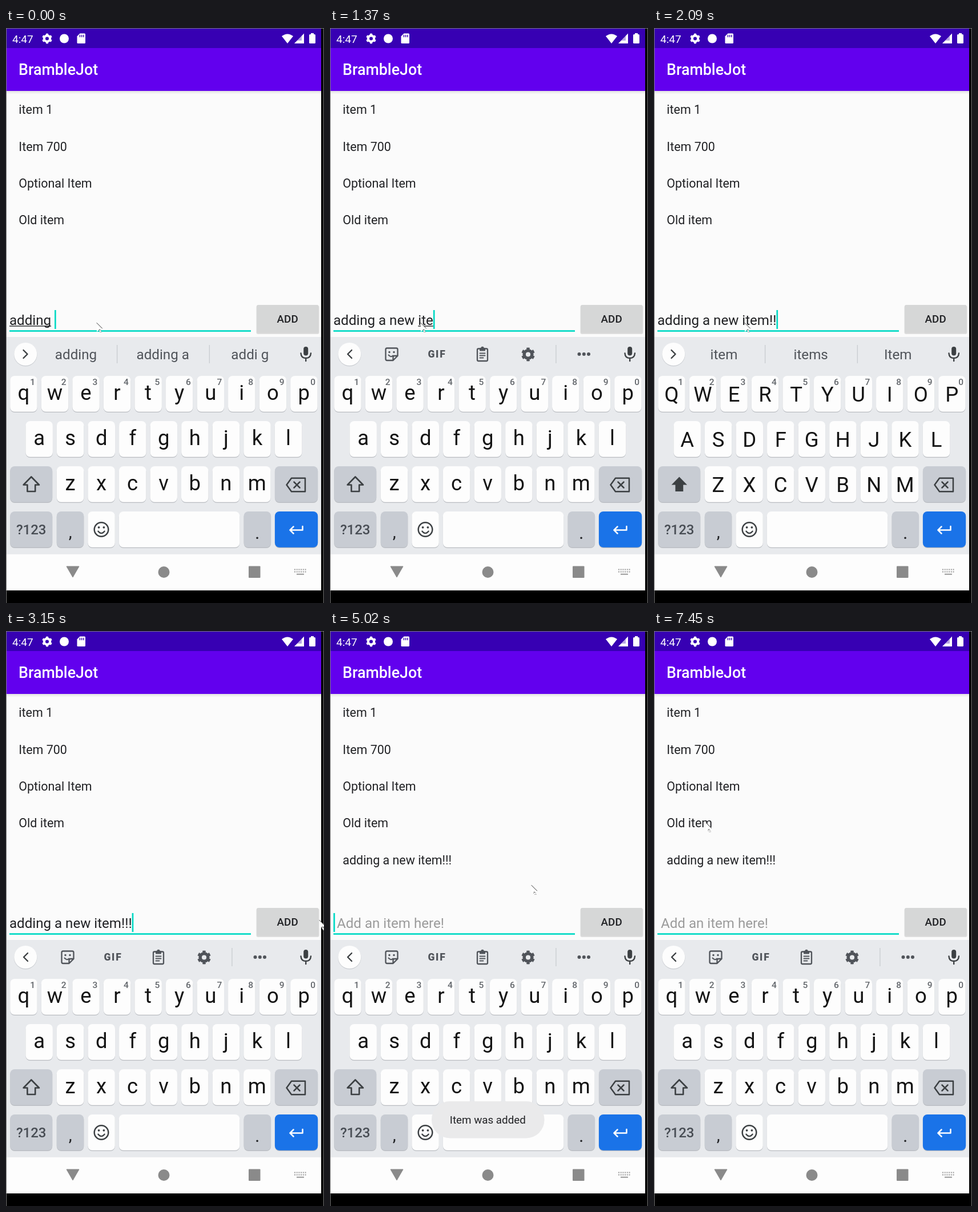
An HTML page that plays this animation: 557 px wide and 1005 px high, repeating every 8 s.

```html
<!DOCTYPE html>
<html lang="en">
<head>
<meta charset="utf-8">
<title>To-do list</title>
<style>
html, body { margin: 0; width: 100%; height: 100%; overflow: hidden; background: #000; }
svg { display: block; width: 557px; height: 1005px; font-family: Roboto, sans-serif; }
text { white-space: pre; }
.mid { text-anchor: middle; }
.line { fill: none; stroke-linecap: round; stroke-linejoin: round; }
</style>
</head>
<body>
<svg id="stage" viewBox="0 0 557 1005"></svg>
<script>
const LOOP = 8000;
const INK = '#202124', ICON = '#50545a', DARK = '#3c4043';
const stage = document.getElementById('stage');

const rect = (x, y, w, h, fill, r = 0, more = '') =>
  `<rect x="${x}" y="${y}" width="${w}" height="${h}" rx="${r}" fill="${fill}" ${more}/>`;
const circle = (x, y, r, fill, more = '') =>
  `<circle cx="${x}" cy="${y}" r="${r}" fill="${fill}" ${more}/>`;
const path = (d, fill, more = '') => `<path d="${d}" fill="${fill}" ${more}/>`;
const line = (d, color, width) =>
  `<path class="line" d="${d}" stroke="${color}" stroke-width="${width}"/>`;
const text = (s, x, y, size, fill, more = '') =>
  `<text x="${x}" y="${y}" font-size="${size}" fill="${fill}" ${more}>${s}</text>`;
const mid = (s, x, y, size, fill, more = '') => text(s, x, y, size, fill, 'class="mid" ' + more);
const group = (id, body, more = '') => `<g id="${id}" ${more}>${body}</g>`;

function gear(x, y, r, color) {
  return circle(x, y, r * 0.57, 'none', `stroke="${color}" stroke-width="${r * 0.46}"`) +
    circle(x, y, r * 0.84, 'none', `stroke="${color}" stroke-width="${r * 0.3}" pathLength="12" stroke-dasharray="1 1" stroke-dashoffset="-.5"`);
}

function statusBar() {
  return rect(1, 1, 551, 34, '#3700b3') +
    text('4:47', 11, 26, 19, '#fff') +
    gear(72, 18.5, 9, '#fff') +
    circle(102, 18.5, 8, '#fff') +
    path('M129.5 9.5H137.5Q139 9.5 139 11V25.5Q139 27 137.5 27H126Q124.5 27 124.5 25.5V14.5Z', '#fff') +
    line('M129.5 12.5V15.5M132.7 12.5V15.5M135.9 12.5V15.5', '#3700b3', 1.5) +
    path('M483 14.3Q493 6.5 503 14.3L493 27Z', '#fff') +
    path('M522 9.5V27H505Z', '#fff') +
    path('M518 13.5V22H510Z', '#3700b3', 'opacity=".35"') +
    rect(531, 11, 11, 16, '#fff', 1.5) + rect(534, 9, 5, 3, '#fff');
}

function appBar() {
  return rect(1, 35, 551, 75, '#6200ee') +
    text('BrambleJot', 22, 82, 26.8, '#fff', 'font-weight="500"') +
    rect(1, 110, 551, 6, 'url(#shade)');
}

function list() {
  return ['item 1', 'Item 700', 'Optional Item', 'Old item', 'adding a new item!!!']
    .map((s, i) => text(s, 22.3, 150.3 + i * 64.3, 21.45, INK, `id="row${i}"`)).join('');
}

function inputRow() {
  return text('Add an item here!', 12, 518.6, 24.12, '#9b9b9b', 'id="hint"') +
    text('', 6, 518.6, 24.12, INK, 'id="entry"') +
    rect(6, 520.3, 0, 1.4, INK, 0, 'id="mark"') +
    rect(6, 528.2, 423, 2.7, '#03dac5') +
    rect(85, 493, 2.7, 33, '#03dac5', 0, 'id="caret"') +
    rect(438.5, 485, 110, 50, '#000', 3, 'opacity=".12"') +
    rect(439, 484, 108.5, 49, '#d6d7d7', 2.5, 'id="button"') +
    mid('ADD', 493.2, 515.4, 18.8, INK, 'font-weight="500" letter-spacing=".2"');
}

function toolbar() {
  return line('M38 563L31 570L38 577', DARK, 2.4) +
    line('M100 559.5H116Q118.5 559.5 118.5 562V573L110.5 581H100Q97.5 581 97.5 578.5V562Q97.5 559.5 100 559.5ZM118 573H113Q110.5 573 110.5 575.5V580.5', ICON, 2.3) +
    circle(104, 566.5, 1.7, ICON) + circle(112, 566.5, 1.7, ICON) +
    line('M102.5 571.5Q107 576.5 110.5 572.5', ICON, 2) +
    mid('GIF', 187.5, 576, 17.5, ICON, 'font-weight="900" letter-spacing="1.8"') +
    rect(258, 560.5, 18, 21.5, 'none', 2, `stroke="${ICON}" stroke-width="2.3"`) +
    rect(262, 559, 10, 5.5, ICON, 1) + circle(267, 559.5, 2.7, ICON) +
    line('M262.5 568.5H271.5M262.5 572.5H271.5M262.5 576.5H268.5', ICON, 1.9) +
    gear(347, 570.5, 12, ICON) +
    rect(395.3, 554, 1.2, 32, '#c6c9ce') +
    [436.5, 444.8, 453].map(x => circle(x, 570, 3, ICON)).join('');
}

function suggestions() {
  return line('M30.5 563L37.5 570L30.5 577', DARK, 2.4) +
    [194, 355.7].map(x => rect(x, 554, 1.2, 32, '#c6c9ce')).join('') +
    [122.5, 274.7, 427.3].map((x, i) => mid('', x, 579.2, 24.2, ICON, `id="word${i}"`)).join('');
}

function mic() {
  return rect(521.2, 557, 8, 15.5, DARK, 4) +
    line('M516.5 568.5Q517 577 525.2 577T534 568.5M525.2 577V582', DARK, 2.4);
}

const key = (x, y, w, fill = '#fdfdfd') =>
  rect(x, y + 1.2, w, 62.8, '#b9bcc1', 8) + rect(x, y, w, 62.8, fill, 8);

function keyboard() {
  const rows = [['qwertyuiop', 7.2, 608], ['asdfghjkl', 34.4, 687], ['zxcvbnm', 88.8, 766]];
  let caps = '', small = '', out = rect(1, 540, 551, 379, '#e8eaed');
  for (const [letters, x0, y] of rows) {
    [...letters].forEach((c, i) => {
      const x = x0 + i * 54.55;
      out += key(x, y, 47.5);
      small += mid(c, x + 23.7, y + 41.5, 36.5, '#141414');
      caps += mid(c.toUpperCase(), x + 23.7, y + 45.3, 36.5, '#141414');
      if (y === 608) out += mid((i + 1) % 10, x + 39.5, 624.3, 15.5, '#62666b', 'font-weight="500"');
    });
  }
  const grey = '#c8ccd3';
  const arrow = 'M44.3 784.5L58 798.5H51.2V810H37.4V798.5H30.6Z';
  out += key(7.2, 766, 74, grey) + key(470.9, 766, 75.3, grey) +
    key(7.2, 845, 74, grey) + key(88.8, 845, 47.5, grey) + key(143.3, 845, 47.5) +
    key(197.8, 845, 211.5) + key(416.6, 845, 47.5, grey) + key(470.9, 845, 75.3, '#1a73e8');
  small += line(arrow, DARK, 2.6);
  caps += path(arrow, DARK);
  out += line('M500 786.8H524V810.3H500L491.5 798.5ZM504.5 793.5L514.5 803.5M514.5 793.5L504.5 803.5', DARK, 2.5) +
    mid('?123', 44.2, 885.3, 24, '#484d54', 'font-weight="500"') +
    mid(',', 112.6, 891, 30, INK) + mid('.', 440.3, 893, 32, INK) +
    circle(167, 876.5, 12.3, 'none', `stroke="${DARK}" stroke-width="2.5"`) +
    circle(162.6, 872.8, 1.9, DARK) + circle(171.4, 872.8, 1.9, DARK) +
    line('M161.3 879.5Q167 886.5 172.7 879.5', DARK, 2.2) +
    line('M519.5 871V877.5H498M503.5 871.5L497.5 877.5L503.5 883.5', '#fff', 2.5);
  return out + circle(34.2, 571, 20.3, '#c9ccd1') + circle(34.2, 570, 20, '#fdfdfd') + mic() +
    group('tools', toolbar()) + group('words', suggestions()) + group('small', small) + group('caps', caps);
}

function navBar() {
  const grey = '#8a8a8a', pale = '#999';
  let out = rect(1, 919, 551, 64, '#fdfdfd') + rect(1, 919, 551, 1, '#ececee') +
    path('M106 941H128L117 960Z', grey, `stroke="${grey}" stroke-linejoin="round"`) +
    circle(276.5, 951, 10, grey) + rect(425, 940.5, 20.5, 20.5, grey, 1);
  for (let i = 0; i < 12; i++) {
    out += rect(505 + (i % 6) * 3.7, 945.5 + Math.floor(i / 6) * 4, 2, 2, pale);
  }
  return out + rect(509, 953.7, 13, 2, pale);
}

const toast = rect(178, 822, 197.5, 64.5, '#eaeaeb', 32) +
  mid('Item was added', 276.3, 861.3, 18.8, INK);

const pointer = path('M0 0V16L3.7 12.8L6.2 18L8.7 17L6.3 11.8H11.5Z', '#fff') +
  line('M0 .5L9.5 10', '#333', 1) +
  line('M4 12.5H6M4 14.5V14.6M7 14V14.1M6 16.5V16.6M8 16.3V16.4', '#444', 1);

const frame = '#777';
stage.innerHTML =
  '<defs><linearGradient id="shade" x2="0" y2="1"><stop stop-color="#000" stop-opacity=".1"/>' +
  '<stop offset="1" stop-color="#000" stop-opacity="0"/></linearGradient></defs>' +
  rect(0, 0, 557, 1005, frame) + rect(1, 1, 555, 1004, '#000') +
  rect(1, 1, 551, 982, '#fbfbfb') +
  statusBar() + appBar() + list() + inputRow() + keyboard() + navBar() +
  group('toast', toast) + group('pointer', pointer);

const $ = id => document.getElementById(id);
const show = (id, on) => $(id).setAttribute('visibility', on ? 'visible' : 'hidden');
const set = (id, name, value) => $(id).setAttribute(name, value);

// Value of the last [time, ...values] entry that has begun.
function at(track, t) {
  let now = track[0];
  for (const entry of track) if (entry[0] <= t) now = entry;
  return now;
}

const PHRASE = 'adding a new item!!!';
const BLINKS = [2770, 3150, 3740, 4170, 4450, 5020, 5480, 5930, 6490, 6900, 7450];
const WORDS = [[0, 'adding', 'adding a', 'addi g'], [160, 'a', 'and', 'add'],
  [460, 'new', 'little', 'few'], [590, 'n', 'new', 'network'], [720, 'ne', 'new', 'next'],
  [850, 'new', 'news', 'newer'], [980, 'one', 'item', 'version'], [1110, 'i', 'is', 'in'],
  [1240, 'it', 'its', 'item'], [1650, 'item', 'items', 'Item']];
const MOVES = [[0, 159, 515], [2770, 205, 518], [2900, 340, 513], [3030, 480, 508],
  [3150, 549, 505], [3300, 546, 505], [3450, 543, 504], [3740, 535, 504], [3880, 531, 504],
  [5020, 353, 444], [5170, 272, 396], [5320, 195, 350], [5480, 140, 318], [5630, 112, 310],
  [5780, 104, 322], [5930, 99, 338], [6230, 91, 334.5]];
const FADES = [[0, 0], [4310, 0.35], [4450, 0.75], [4590, 1], [6230, 0.75], [6360, 0.45], [6490, 0.15], [6620, 0]];
const ROW = [[0, 0], [4170, 0.56], [4310, 0.85], [4450, 1]];

function typed(t) {
  if (t < 160) return 7;
  if (t < 460) return 8;
  if (t < 1510) return Math.min(16, 9 + Math.floor((t - 460) / 130));
  return t < 1940 ? 17 : t < 2090 ? 18 : t < 2230 ? 19 : 20;
}

function draw(t) {
  const sent = t >= 4170;
  const entry = sent ? '' : PHRASE.slice(0, typed(t));
  const box = $('entry');
  if (box.textContent !== entry) box.textContent = entry;
  const width = entry ? box.getComputedTextLength() : 0;
  set('caret', 'x', 6 + width);
  show('caret', BLINKS.filter(b => b <= t).length % 2 === 0);
  show('hint', sent);

  // Underline the word being composed.
  const word = t < 160 ? 'adding' : (entry.match(/[a-z]+$/) || [''])[0];
  const start = entry.lastIndexOf(word);
  show('mark', word);
  if (word) {
    set('mark', 'x', 6 + (start > 0 ? box.getSubStringLength(0, start) : 0));
    set('mark', 'width', box.getSubStringLength(start, word.length));
  }

  const tools = (t >= 1370 && t < 1650) || t >= 2230;
  show('tools', tools);
  show('words', !tools);
  at(WORDS, t).slice(1).forEach((s, i) => { $('word' + i).textContent = s; });

  const upper = t >= 1800 && t < 2230;
  show('caps', upper);
  show('small', !upper);

  set('button', 'fill', t >= 3880 && t < 4170 ? '#c6c7c7' : '#d6d7d7');
  set('row4', 'opacity', at(ROW, t)[1]);
  set('toast', 'opacity', at(FADES, t)[1]);
  const [, x, y] = at(MOVES, t);
  set('pointer', 'transform', `translate(${x} ${y})`);
}

const begin = performance.now();
function tick() {
  draw((performance.now() - begin) % LOOP);
  requestAnimationFrame(tick);
}
tick();
</script>
</body>
</html>
```
